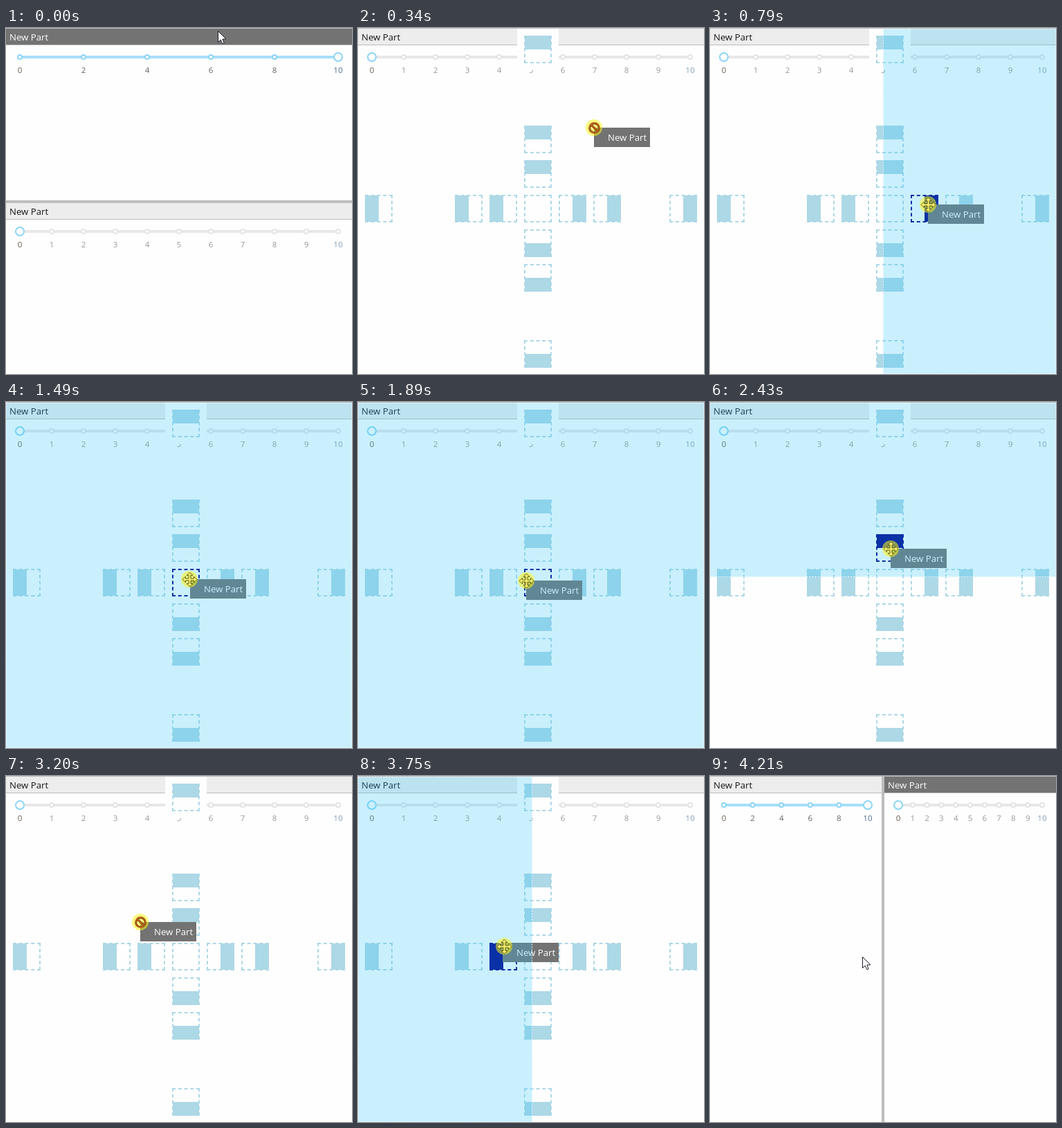
Recreate the animation shown at these times as an HTML page with a canvas. Size 500 px wide and 500 px high, loop 6.21 s.

```html
<!DOCTYPE html>
<html lang="en">
<head>
<meta charset="utf-8">
<title>Docking panels</title>
<style>
html, body { margin: 0; width: 100%; height: 100%; overflow: hidden; background: #fefefe; }
canvas { display: block; width: 500px; height: 500px; }
</style>
</head>
<body>
<canvas id="stage" width="500" height="500"></canvas>
<script>
const ctx = document.getElementById('stage').getContext('2d');
const LOOP = 6210, DRAG = 170, DROP = 4210;
const TITLE = 'New Part';
const FONT = '"Open Sans", "Noto Sans", sans-serif';

// time, pointer x, y and, where the label lags, its own x, y
const path = [
  [170, 311, 15], [250, 325, 72], [330, 341, 144], [410, 352, 208], [490, 356, 243],
  [640, 347, 248], [710, 330, 252], [790, 315, 255],
  [1250, 307, 256], [1330, 294, 257], [1410, 277, 257], [1490, 265, 256, 266, 256], [1590, 260, 257],
  [1810, 254, 257], [1890, 243, 258], [1970, 232, 258], [2050, 220, 257], [2120, 213, 255],
  [2190, 215, 250], [2270, 225, 241.5, 223, 243], [2350, 243, 226], [2430, 261, 212],
  [2960, 252, 211], [3040, 232, 210], [3120, 210, 210], [3200, 194, 211],
  [3750, 211, 246, 209, 241], [3830, 218, 256], [3910, 221, 261]
];

const guides = [{ x: 240, y: 241, side: 'all' }];
const addGuides = (side, list, vertical) => list.forEach(p =>
  guides.push(vertical ? { x: 240, y: p, side } : { x: p, y: 241, side }));
addGuides('top', [11, 141, 191], true);
addGuides('bottom', [291, 341, 451], true);
addGuides('left', [10, 140, 190]);
addGuides('right', [290, 340, 450]);

const zones = {
  all: [0, 1, 500, 499], left: [0, 1, 252, 499], right: [250, 1, 250, 499],
  top: [0, 1, 500, 252], bottom: [0, 249, 500, 251]
};
const halves = {
  top: [1, 0, 38, 20], bottom: [1, 20, 38, 20], left: [0, 1, 20, 38], right: [20, 1, 20, 38]
};

function box(color, x, y, w, h) {
  ctx.fillStyle = color;
  ctx.fillRect(x, y, w, h);
}

function text(str, x, y, size, color, align = 'left') {
  ctx.font = size + 'px ' + FONT;
  ctx.textAlign = align;
  ctx.fillStyle = color;
  ctx.fillText(str, x, y);
}

function ring(x, y, r, color, width = 2) {
  ctx.beginPath();
  ctx.arc(x, y, r, 0, Math.PI * 2);
  ctx.fillStyle = '#fff';
  ctx.fill();
  ctx.lineWidth = width;
  ctx.strokeStyle = color;
  ctx.stroke();
}

function polygon(points, fill, stroke) {
  ctx.beginPath();
  points.forEach(([x, y]) => ctx.lineTo(x, y));
  ctx.closePath();
  ctx.fillStyle = fill;
  ctx.fill();
  ctx.lineWidth = 1;
  ctx.strokeStyle = stroke;
  ctx.stroke();
}

function slider(x0, x1, y, step, value) {
  const full = value === 10;
  box(full ? '#a6dff8' : '#e7e7e7', x0, y - 2, x1 - x0, 4);
  for (let v = 0; v <= 10; v += step) {
    const x = x0 + (x1 - x0) * v / 10;
    const on = v <= value;
    if (v === value) ring(x, y, 6, '#8dd5f7');
    else ring(x, y, 3, on ? '#8dd5f7' : '#e4e4e4');
    let color = on ? '#686460' : '#9c9a98';
    if (v === 10) color = on ? '#4f6f96' : '#86a0bd';
    if (v === 0) color = '#655a4e';
    text(v, x, y + 23, 11.6, color, 'center');
  }
}

function panel(x, y, w, active, step, value) {
  box('#bdbdbd', x, y, w, 25);
  box(active ? '#737373' : '#ededed', x, y + 1, w, 23);
  text(TITLE, x + 5, y + 18, 13.2, active ? '#fff' : '#16161c');
  slider(x + 20, x + w - 20, y + 42, step, value);
}

function guide(g, active) {
  const color = active ? '#00008b' : '#add8e6';
  box('#fefefe', g.x - 10, g.y - 10, 60, 60);
  ctx.save();
  ctx.translate(g.x, g.y);
  if (halves[g.side]) box(color, ...halves[g.side]);
  ctx.strokeStyle = color;
  ctx.lineWidth = 2;
  ctx.setLineDash([5, 3.75]);
  const edges = [[0, 1, 40, 1], [0, 39, 40, 39], [1, 0, 1, 40], [39, 0, 39, 40]];
  for (const [ax, ay, bx, by] of edges) {
    ctx.beginPath();
    ctx.moveTo(ax, ay);
    ctx.lineTo(bx, by);
    ctx.stroke();
  }
  ctx.restore();
}

function preview(side) {
  const [x, y, w, h] = zones[side];
  box('rgba(47,195,247,.25)', x, y, w, h);
  ctx.save();
  ctx.setLineDash([2, 2]);
  ctx.lineWidth = 1;
  ctx.strokeStyle = 'rgba(255,255,255,.85)';
  ctx.strokeRect(x + .5, y + .5, w - 1, h - 1);
  ctx.restore();
}

function halo(x, y) {
  ctx.beginPath();
  ctx.arc(x, y, 12, 0, Math.PI * 2);
  ctx.fillStyle = 'rgba(255,245,20,.55)';
  ctx.fill();
}

function moveCursor(x, y) {
  const arm = [[-1.5, -1.5], [-1.5, -6], [-4.5, -6], [0, -10.5], [4.5, -6], [1.5, -6]];
  const points = [];
  for (let i = 0; i < 4; i++) {
    const c = [1, 0, -1, 0][i], s = [0, 1, 0, -1][i];
    arm.forEach(([px, py]) => points.push([x + px * c - py * s, y + px * s + py * c]));
  }
  polygon(points, '#f2ee6a', '#65651c');
}

function blockedCursor(x, y) {
  for (const [color, width] of [['#6e3f12', 3], ['#dd6a1c', 1.2]]) {
    ctx.strokeStyle = color;
    ctx.lineWidth = width;
    ctx.beginPath();
    ctx.arc(x, y, 6.8, 0, Math.PI * 2);
    ctx.moveTo(x - 4.8, y - 4.8);
    ctx.lineTo(x + 4.8, y + 4.8);
    ctx.stroke();
  }
}

function arrowCursor(x, y) {
  const shape = [[0, 0], [0, 16], [3.7, 12.6], [6.2, 18.2], [8.7, 17.2], [6.3, 11.6], [11.3, 11.4]];
  polygon(shape.map(([px, py]) => [x + .5 + px, y + .5 + py]), '#fff', '#1c1c2c');
}

function drawDrag(t) {
  let key = path[0];
  for (const k of path) if (k[0] <= t) key = k;
  const [, x, y, lx = x, ly = y] = key;
  const hit = guides.find(g => x >= g.x && x < g.x + 40 && y >= g.y && y < g.y + 40);

  panel(0, 0, 500, false, 1, 0);
  guides.forEach(g => guide(g, g === hit));
  box('#737373', lx, ly, 81, 28);
  text(TITLE, lx + 20, ly + 19, 13.2, '#fff');
  if (hit) preview(hit.side);
  halo(x, y);
  (hit ? moveCursor : blockedCursor)(x + .5, y + .5);
}

function draw(t) {
  box('#fefefe', 0, 0, 500, 500);
  if (t < DRAG) {
    panel(0, 0, 500, true, 2, 10);
    panel(0, 252, 500, false, 1, 0);
    box('#bdbdbd', 0, 249, 500, 4);
    arrowCursor(306, 4);
  } else if (t < DROP) {
    drawDrag(t);
  } else {
    panel(0, 0, 248, false, 2, 10);
    panel(252, 0, 248, true, 1, 0);
    box('#bdbdbd', 248, 0, 4, 500);
    arrowCursor(220, 261);
  }
}

const start = performance.now();
function tick() {
  draw((performance.now() - start) % LOOP);
  requestAnimationFrame(tick);
}
tick();
</script>
</body>
</html>
```
